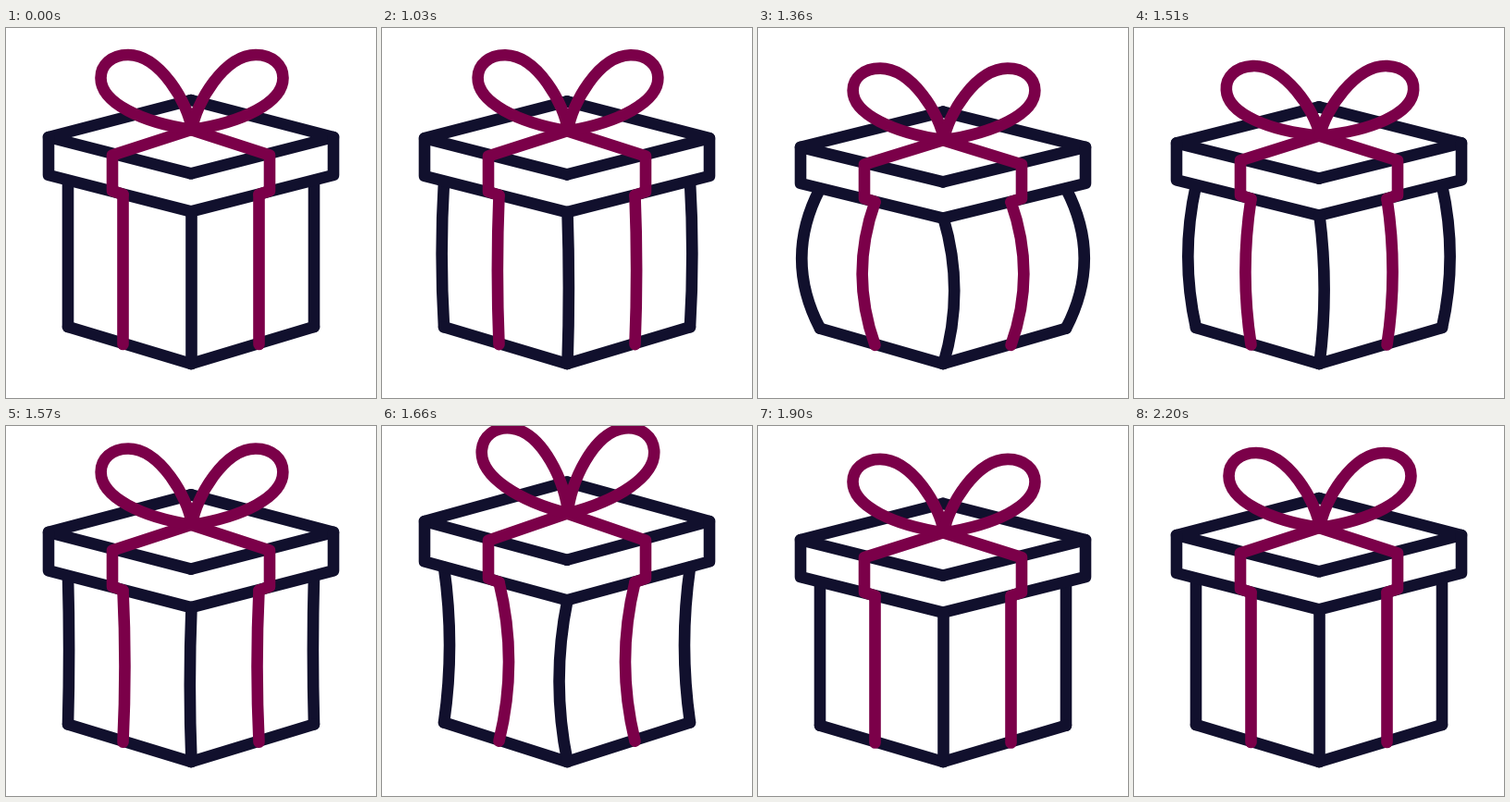
Animation, 400 px wide and 400 px high, one loop 2.23 s. Source, as an HTML page with a canvas:

```html
<!DOCTYPE html>
<html lang="en">
<head>
<meta charset="utf-8">
<title>Gift box</title>
<style>
  html, body { margin: 0; width: 100%; height: 100%; overflow: hidden; background: #fff; }
  canvas { display: block; width: 100vmin; height: 100vmin; }
</style>
</head>
<body>
<canvas id="stage" width="400" height="400"></canvas>
<script>
const ctx = document.getElementById('stage').getContext('2d');
const LOOP = 2230, START = 1030, STEP = 30, REST = 1000;
const NAVY = '#11102d', WINE = '#7b0049';
const MID = 200, GROUND = 363;
const LID = { half: 154, back: 78, corner: 118, front: 157.3, depth: 41 };
const KNOT = 110;

// Extreme poses: [time in ms, value].
const STRETCH = [[1440, -0.046], [1690, 0.065], [1900, -0.0205], [2110, 0.008], [2200, 0]];
const BEND = [[1400, -1], [1690, 0.8], [1900, 0]];
const BOW = [[1210, 5], [1480, -3.3], [1690, 5.5], [1900, 0]];

// Leaves rest quickly, then swings from pose to pose.
function swing(poses, t) {
  let time = REST, value = 0;
  for (const [nextTime, nextValue] of poses) {
    if (t < nextTime) {
      const u = Math.max(0, (t - time) / (nextTime - time));
      const eased = time === REST ? Math.sin(u * Math.PI / 2) : (1 - Math.cos(u * Math.PI)) / 2;
      return value + (nextValue - value) * eased;
    }
    [time, value] = [nextTime, nextValue];
  }
  return value;
}

function draw(t) {
  const scale = 1 + swing(STRETCH, t);
  const bend = swing(BEND, t);
  const inner = 14 * bend;
  const side = inner - 6 * Math.abs(bend);
  const angle = swing(BOW, t) * Math.PI / 180;
  const Y = y => GROUND + (y - GROUND) * scale;

  function stroke(color, build) {
    ctx.strokeStyle = color;
    ctx.beginPath();
    build();
    ctx.stroke();
  }
  // Offsets run outward from the middle; dir is -1 for left, 1 for right.
  function line(color, dir, points) {
    stroke(color, () => {
      for (const [out, y] of points) ctx.lineTo(MID + dir * out, Y(y));
    });
  }
  function upright(color, x, top, bottom, sag) {
    stroke(color, () => {
      ctx.moveTo(x, Y(top));
      ctx.quadraticCurveTo(x + 2 * sag, Y((top + bottom) / 2), x, Y(bottom));
    });
  }
  function boxHalf(dir) {
    const { half, back, corner, front, depth } = LID;
    upright(NAVY, MID + dir * 133, 165, 323, -dir * side);
    line(NAVY, dir, [[133, 323], [0, GROUND]]);
    line(NAVY, dir, [[0, back], [half, corner], [0, front]]);
    line(NAVY, dir, [[half, corner], [half, corner + depth], [0, front + depth]]);
  }
  function ribbonHalf(dir) {
    line(WINE, dir, [[0, KNOT], [85, 137.5], [85, 176], [73.5, 180]]);
    upright(WINE, MID + dir * 73.5, 180, 342, -dir * inner);
  }
  function bowLoop(dir) {
    const c = Math.cos(angle), s = Math.sin(angle);
    const P = (out, up) => [MID + 1 + dir * (out * c - up * s), Y(KNOT - out * s - up * c)];
    const curve = (a, b, d) => ctx.bezierCurveTo(...a, ...b, ...d);
    stroke(WINE, () => {
      ctx.moveTo(...P(0, 0));
      curve(P(4, 29), P(35, 81), P(69, 81));
      curve(P(87, 81), P(98.5, 70), P(98.5, 56));
      curve(P(98.5, 29), P(54, 8), P(0, 0));
    });
  }

  ctx.fillStyle = '#fff';
  ctx.fillRect(0, 0, 400, 400);
  ctx.lineWidth = 12.6;
  ctx.lineCap = ctx.lineJoin = 'round';

  const sides = [-1, 1];
  sides.forEach(boxHalf);
  upright(NAVY, MID + 0.5, LID.front + LID.depth, GROUND, -0.85 * inner);
  sides.forEach(ribbonHalf);
  sides.forEach(bowLoop);
}

function tick() {
  const t = performance.now() % LOOP;
  draw(t < START ? 0 : START + Math.floor((t - START) / STEP) * STEP);
  requestAnimationFrame(tick);
}
tick();
</script>
</body>
</html>
```
